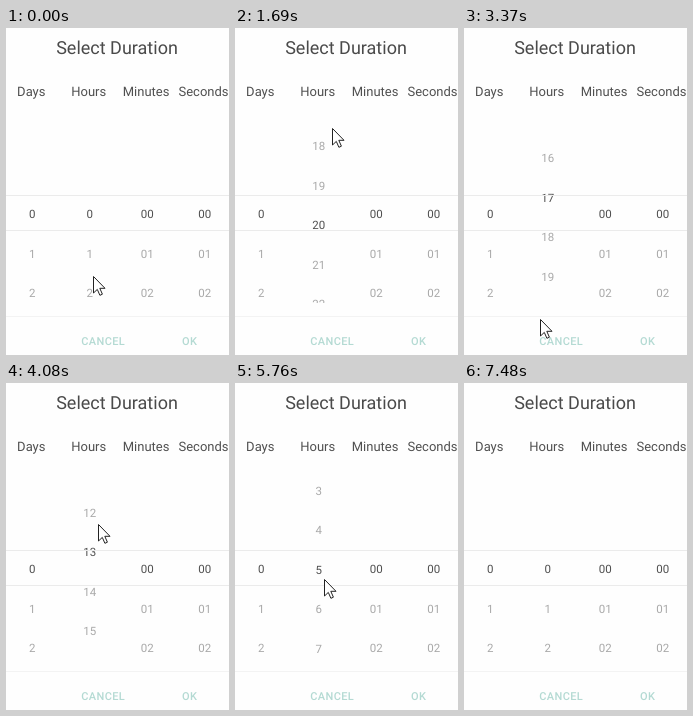
Animation of 223 by 327 pixels, one loop 7880 ms. Source, as an HTML page:

```html
<!DOCTYPE html>
<html lang="en">
<head>
<meta charset="utf-8">
<title>Select Duration</title>
<style>
  html, body { margin: 0; width: 100%; height: 100%; overflow: hidden; background: #fefefe; }
  svg { display: block; width: 223px; height: 327px; font-family: Roboto, sans-serif; text-anchor: middle; text-rendering: geometricPrecision; }
  .title { font-size: 18px; fill: #4a4a4a; }
  .head { font-size: 13px; fill: #505050; }
  .num { font-size: 11.5px; fill: #a9a9a9; }
  .num.on { fill: #505050; }
  .btn { font-size: 11px; font-weight: 500; letter-spacing: .4px; fill: #b4dad3; }
</style>
</head>
<body>
<svg viewBox="0 0 223 327">
  <clipPath id="view"><rect y="97" width="223" height="178"/></clipPath>
  <text class="title" x="111" y="25.6">Select Duration</text>
  <g id="heads"></g>
  <g id="wheels" clip-path="url(#view)"></g>
  <path d="M0 167.5H223M0 202.5H223" stroke="#ebebeb"/>
  <path d="M0 288.5H223" stroke="#f3f3f3"/>
  <text class="btn" x="97.2" y="317">CANCEL</text>
  <text class="btn" x="183.7" y="317">OK</text>
  <path id="cursor" d="M.5 .5V17L4.3 13.4 6.9 19.3 9.4 18.2 6.8 12.3H12Z"
        fill="#fff" stroke="#222" stroke-linejoin="round"/>
</svg>
<script>
const LOOP = 7880, FIRST = 390, HOLD = 78;
const ROW = 39.5, MID = 190, DRAG = 340, FLING = 600;

// Each swipe: start time, pointer from and to, hour shown when it starts
const swipe = (t, from, to, hour) => ({ t, from, to, hour });
const swipes = [
  swipe(330, [87, 248], [89, 71], 0),
  swipe(1110, [73, 285], [100, 74], 7.52),
  swipe(2217, [79, 261], [100, 123], 23),
  swipe(2960, [90, 124], [76, 293], 23),
  swipe(4080, [92, 141], [82, 264], 13.43),
  swipe(5040, [90, 139], [86, 264], 8.64),
  swipe(5980, [92, 137], [93, 260], 4.92),
  swipe(7070, [185, 284], [203, 330], 0)
];

const clamp = (v, lo, hi) => Math.min(hi, Math.max(lo, v));
const mix = (a, b, k) => a + (b - a) * k;
const smooth = k => (1 - Math.cos(Math.PI * clamp(k, 0, 1))) / 2;
const slow = k => 1 - (1 - clamp(k, 0, 1)) ** 3;

// The wheel follows the pointer during a drag, then flings on while the pointer returns.
function pose(t) {
  const i = Math.max(0, swipes.findLastIndex(s => s.t <= t));
  const s = swipes[i], next = swipes[i + 1];
  const k = smooth((t - s.t) / DRAG);
  let [x, y] = s.from.map((v, j) => mix(v, s.to[j], k));
  let hour = clamp(s.hour - (y - s.from[1]) / ROW, 0, 23);
  const after = t - s.t - DRAG;
  if (after > 0 && next) {
    const gap = next.t - s.t - DRAG;
    [x, y] = s.to.map((v, j) => mix(v, next.from[j], smooth(after / gap)));
    hour = mix(hour, next.hour, slow(after / Math.min(FLING, gap)));
  }
  return { x, y, hour };
}

const get = id => document.getElementById(id);

function label(parent, cls, x, y, str) {
  const el = document.createElementNS("http://www.w3.org/2000/svg", "text");
  el.setAttribute("class", cls);
  el.setAttribute("x", x);
  el.setAttribute("y", y);
  el.textContent = str;
  parent.append(el);
  return el;
}

["Days", "Hours", "Minutes", "Seconds"].forEach((name, i) => {
  label(get("heads"), "head", 25.3 + i * 57.4, 68, name);
  if (i === 1) return;
  for (let n = 0; n < 3; n++)
    label(get("wheels"), n ? "num" : "num on", 26.3 + i * 57.5, MID + n * ROW, i ? "0" + n : n);
});
const hours = Array.from({ length: 24 }, (_, n) => label(get("wheels"), "num", 83.8, 0, n));

function draw(t) {
  const held = t < FIRST ? 0 : t - (t - FIRST) % HOLD;
  const { x, y, hour } = pose(held);
  hours.forEach((el, n) => {
    el.setAttribute("y", MID + (n - hour) * ROW);
    el.setAttribute("class", n === Math.round(hour) ? "num on" : "num");
  });
  get("cursor").setAttribute("transform", `translate(${Math.round(x)} ${Math.round(y)})`);
}

const start = performance.now();
function frame() {
  draw((performance.now() - start) % LOOP);
  requestAnimationFrame(frame);
}
frame();
</script>
</body>
</html>
```
